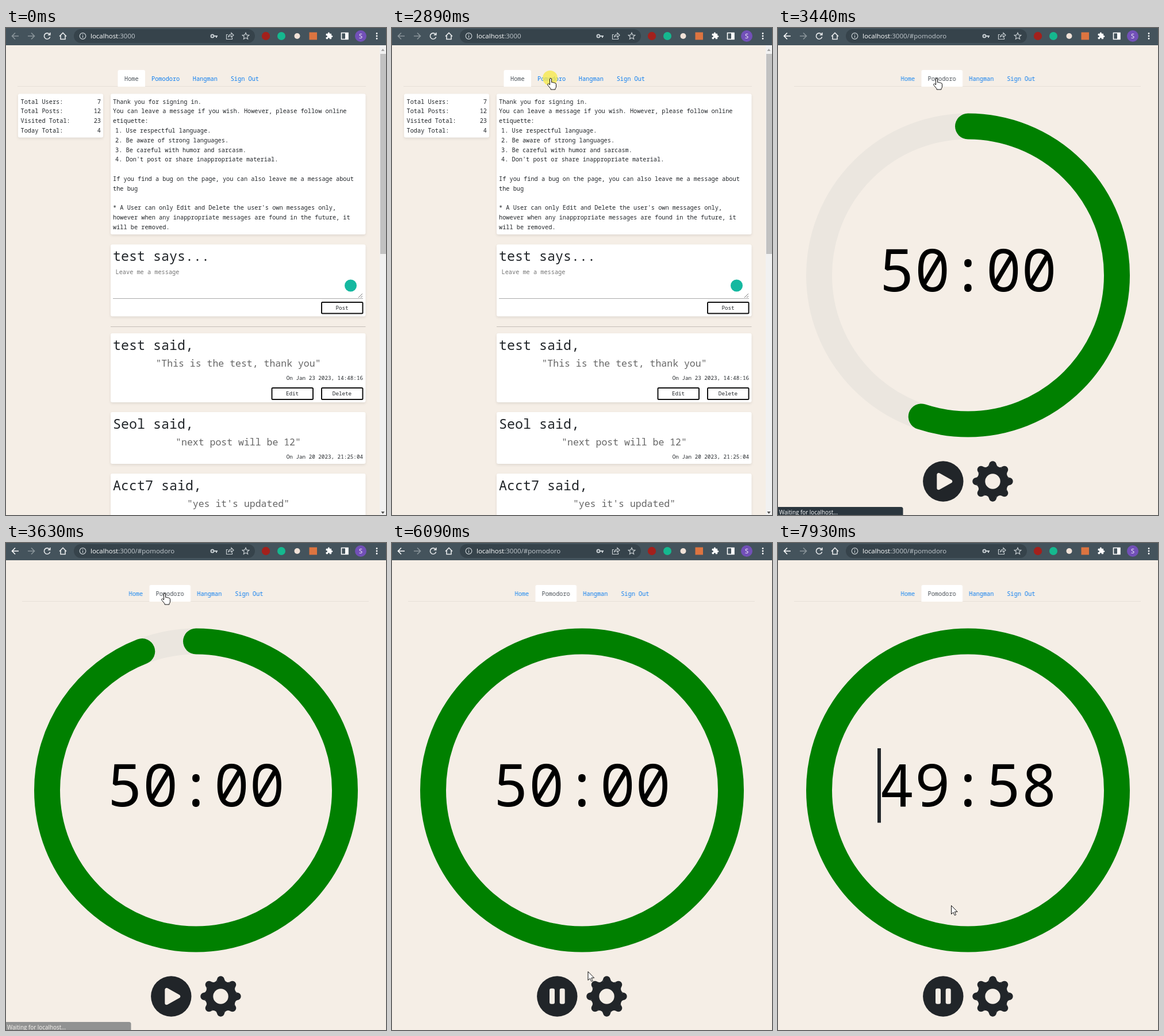
These frames come from a looping animation (661x847 px, 8 s). An HTML page:

```html
<!DOCTYPE html>
<html lang="en">
<head>
<meta charset="utf-8">
<title>Message board and timer</title>
<style>
html, body { margin: 0; width: 100%; height: 100%; overflow: hidden; background: #f5eee6; }
svg { display: block; width: 661px; height: 847px; }
text { font: 10.27px "Noto Sans Mono", monospace; fill: #212529; white-space: pre; }
.ui text { font: 11.5px "Open Sans", sans-serif; fill: #fff; }
.ui .initial { font-size: 11px; }
.ui .small { font-size: 9.9px; }
.line { fill: none; stroke: #e8eaec; stroke-width: 1.6; }
.thin { stroke: #c6cdd1; stroke-width: 1.2; }
.card { fill: #fff; filter: drop-shadow(0 2px 2px rgba(0, 0, 0, .09)); }
.bold { font-weight: 700; }
.end { text-anchor: end; }
.mid { text-anchor: middle; }
.title { font-size: 23.33px; }
.quote { font-size: 16.5px; fill: #666; text-anchor: middle; }
.note { font-size: 9.25px; }
.btn { fill: #fff; stroke: #111; stroke-width: 2; }
.rule { stroke: #e6dfd8; }
.clock text { font-size: 103px; fill: #000; text-anchor: middle; }
.ring { fill: none; stroke-width: 45; }
.dark { fill: #212529; }
.bg { fill: #f5eee6; }

/* Hard switches on an 8 s loop */
.k { animation: 8s step-end infinite; }
.home { animation-name: home; }
.timer { animation-name: timer; }
.nav { animation-name: nav; }
.back { animation-name: back; }
.path { animation-name: path; }
.tab1 { animation-name: tab1; }
.tab2 { animation-name: tab2; }
.link1 { animation-name: link1; }
.link2 { animation-name: link2; }
.t0 { animation-name: t0; }
.t1 { animation-name: t1; }
.t2 { animation-name: t2; }
.t3 { animation-name: t3; }
.play { animation-name: play; }
.pause { animation-name: pause; }
.caretR { animation-name: caretR; }
.caretL { animation-name: caretL; }
.hand { animation-name: hand; }
.arrow { animation-name: arrow; }
.click { animation-name: click; }
@keyframes home { 0% { opacity: 1 } 40.75%, 100% { opacity: 0 } }
@keyframes timer { 0% { opacity: 0 } 40.75%, 100% { opacity: 1 } }
@keyframes nav { 0% { transform: none } 40.75%, 100% { transform: translateX(7.5px) } }
@keyframes back { 0% { stroke: #8b959b } 40.75%, 100% { stroke: #fff } }
@keyframes path { 0% { fill: transparent } 40.75%, 100% { fill: #c3cacf } }
@keyframes tab1 { 0% { opacity: 1 } 41.75%, 100% { opacity: 0 } }
@keyframes tab2 { 0% { opacity: 0 } 41.75%, 100% { opacity: 1 } }
@keyframes link1 { 0% { fill: #495057 } 41.75%, 100% { fill: #1a88f0 } }
@keyframes link2 { 0% { fill: #0f7ff0 } 41.75%, 100% { fill: #495057 } }
@keyframes t0 { 0% { opacity: 1 } 41.75%, 100% { opacity: 0 } }
@keyframes t1 { 0% { opacity: 0 } 41.75% { opacity: 1 } 78.875%, 100% { opacity: 0 } }
@keyframes t2 { 0% { opacity: 0 } 78.875% { opacity: 1 } 91.375%, 100% { opacity: 0 } }
@keyframes t3 { 0% { opacity: 0 } 91.375%, 100% { opacity: 1 } }
@keyframes play { 0% { opacity: 1 } 68.75%, 100% { opacity: 0 } }
@keyframes pause { 0% { opacity: 0 } 68.75%, 100% { opacity: 1 } }
@keyframes caretR { 0% { opacity: 0 } 67.875% { opacity: 1 } 74.5%, 100% { opacity: 0 } }
@keyframes caretL { 0% { opacity: 0 } 81.375% { opacity: 1 } 87.875% { opacity: 0 } 94.5%, 100% { opacity: 1 } }
@keyframes hand { 0% { opacity: 0 } 11% { opacity: 1 } 50.75%, 100% { opacity: 0 } }
@keyframes arrow { 0% { opacity: 0 } 2% { opacity: 1 } 11% { opacity: 0 } 50.75%, 100% { opacity: 1 } }
@keyframes click { 0% { opacity: 0 } 36.125% { opacity: .78 } 40.75% { opacity: 0 } 67.625% { opacity: .78 } 69.875%, 100% { opacity: 0 } }

/* Smooth motion */
.fill { stroke-dasharray: 100 200; animation: fill 8s ease infinite; }
@keyframes fill { 0%, 41% { stroke-dashoffset: 101 } 47.25%, 100% { stroke-dashoffset: 0 } }
.status { animation: status 8s linear infinite; }
@keyframes status { 0%, 44.25% { opacity: 1 } 46.5%, 100% { opacity: 0 } }
.cursor { animation: cursor 8s linear infinite; }
@keyframes cursor {
  0%, 2% { transform: translate(627px, 780px); animation-timing-function: ease-out }
  11.25%, 13.49% { transform: translate(275px, 93px) }
  13.5%, 50.2% { transform: translate(275px, 87px); animation-timing-function: ease-in }
  55.5% { transform: translate(347px, 420px) }
  59% { transform: translate(305px, 664px); animation-timing-function: ease-out }
  60.75%, 61.99% { transform: translate(294px, 779px) }
  62%, 74% { transform: translate(294px, 780px) }
  78.875% { transform: translate(400px, 700px) }
  82.25%, 88.8% { transform: translate(421px, 660px) }
  92.5% { transform: translate(576px, 520px) }
  95% { transform: translate(530px, 345px) }
  97% { transform: translate(385px, 298px) }
  98.125% { transform: translate(116px, 430px) }
  99.1%, 100% { transform: translate(301px, 630px) }
}
</style>
</head>
<body>
<svg viewBox="0 0 661 847">
  <defs>
    <path id="tooth" d="M0 0L-1.505-6.61l.1-.34c.413-1.4 2.397-1.4 2.81 0l.1.34a1.464 1.464 0 0 0 2.105.872z"/>
    <g id="teeth"><use href="#tooth"/><use href="#tooth" transform="rotate(45)"/></g>
  </defs>
  <rect class="bg" width="661" height="847"/>

  <!-- Message board -->
  <g class="k home">
    <path class="rule" d="M20 101.5H626"/>
    <rect x="650" y="30" width="11" height="817" fill="#f1f1f1"/>
    <rect x="651" y="45" width="10" height="348" fill="#c1c1c1"/>
    <path d="M652.5 40l3-4 3 4z" fill="#a3a3a3"/>
    <path d="M652.5 841l3 4 3-4z" fill="#505050"/>

    <rect class="card" x="21" y="114.500" width="148" height="76" rx="3"/>
    <g class="bold">
      <text x="25.500" y="131.500">Total Users:</text>
      <text x="25.500" y="148.300">Total Posts:</text>
      <text x="25.500" y="165.100">Visited Total:</text>
      <text x="25.500" y="181.900">Today Total:</text>
    </g>
    <g class="end">
      <text x="165" y="131.500">7</text>
      <text x="165" y="148.300">12</text>
      <text x="165" y="165.100">23</text>
      <text x="165" y="181.900">4</text>
    </g>

    <rect class="card" x="182" y="114.500" width="443.500" height="244.500" rx="3"/>
    <text x="186" y="131.500">Thank you for signing in.</text>
    <text x="186" y="148.300">You can leave a message if you wish. However, please follow online</text>
    <text x="186" y="165.100">etiquette:</text>
    <text x="190" y="181.900">1. Use respectful language.</text>
    <text x="190" y="198.700">2. Be aware of strong languages.</text>
    <text x="190" y="215.500">3. Be careful with humor and sarcasm.</text>
    <text x="190" y="232.300">4. Don't post or share inappropriate material.</text>
    <g class="bold">
      <text x="186" y="265.900">If you find a bug on the page, you can also leave me a message about</text>
      <text x="186" y="282.700">the bug</text>
    </g>
    <text x="186" y="316.300">* A User can only Edit and Delete the user's own messages only,</text>
    <text x="186" y="333.100">however when any inappropriate messages are found in the future, it</text>
    <text x="186" y="349.900">will be removed.</text>

    <rect class="card" x="182" y="376.500" width="443.500" height="125" rx="3"/>
    <text class="title" x="186" y="405">test says...</text>
    <text x="190.500" y="427.500" style="fill:#757575">Leave me a message</text>
    <path d="M186 470.500H621" stroke="#aaa"/>
    <path d="M613 469l7-7M617 469l3-3" stroke="#666" stroke-width=".9"/>
    <circle cx="599.500" cy="448" r="10.500" fill="#15b8a0"/>
    <rect class="btn" x="549" y="477" width="71.500" height="19.500" rx="1.500"/>
    <text class="note mid" x="584.500" y="489.800">Post</text>

    <path d="M182 519.500H625.500" stroke="#c4beb8"/>

    <rect class="card" x="182" y="531" width="443.500" height="120" rx="3"/>
    <text class="title" x="186" y="559.500">test said,</text>
    <text class="quote" x="404" y="589">"This is the test, thank you"</text>
    <text class="note end" x="621" y="611.500">On Jan 23 2023, 14:48:16</text>
    <rect class="btn" x="462.500" y="626" width="71.500" height="20" rx="1.500"/>
    <rect class="btn" x="549" y="626" width="71.500" height="20" rx="1.500"/>
    <text class="note mid" x="498" y="639.300">Edit</text>
    <text class="note mid" x="584.500" y="639.300">Delete</text>

    <rect class="card" x="182" y="668" width="443.500" height="90" rx="3"/>
    <text class="title" x="186" y="696.500">Seol said,</text>
    <text class="quote" x="404" y="726">"next post will be 12"</text>
    <text class="note end" x="621" y="748.500">On Jan 20 2023, 21:25:04</text>

    <rect class="card" x="182" y="775" width="443.500" height="90" rx="3"/>
    <text class="title" x="186" y="803.500">Acct7 said,</text>
    <text class="quote" x="404" y="833">"yes it's updated"</text>
  </g>

  <!-- Timer -->
  <g class="k timer">
    <path class="rule" d="M28 101.500H631"/>
    <circle class="ring" cx="330.500" cy="430" r="259" stroke="#ebe6df"/>
    <circle class="ring fill" cx="330.500" cy="430" r="259" stroke="#008000" stroke-linecap="round" pathLength="100" transform="rotate(-90 330.500 430)"/>
    <g class="clock">
      <text class="k t0" x="330.500" y="458">00:00</text>
      <text class="k t1" x="330.500" y="458">50:00</text>
      <text class="k t2" x="330.500" y="458">49:59</text>
      <text class="k t3" x="330.500" y="458">49:58</text>
    </g>
    <rect class="dark k caretR" x="482" y="357" width="6" height="129.500"/>
    <rect class="dark k caretL" x="173" y="357" width="6" height="129.500"/>
    <circle class="dark" cx="287.300" cy="788.500" r="35.200"/>
    <path class="bg k play" d="M279.500 777v23l20.500-11.500z" stroke="#f5eee6" stroke-width="6.400" stroke-linejoin="round"/>
    <g class="bg k pause">
      <rect x="274" y="774.800" width="9" height="27" rx="3"/>
      <rect x="291.700" y="774.800" width="9" height="27" rx="3"/>
    </g>
    <g class="dark" transform="translate(373.500 788.500) scale(4.400)">
      <circle r="6.100"/>
      <use href="#teeth"/>
      <use href="#teeth" transform="rotate(90)"/>
      <use href="#teeth" transform="rotate(180)"/>
      <use href="#teeth" transform="rotate(270)"/>
      <circle class="bg" r="3"/>
    </g>
    <g class="ui status">
      <path d="M0 833H214q3.500 0 3.500 3.500V847H0z" fill="#2b363e"/>
      <text class="small" x="2" y="846">Waiting for localhost...</text>
    </g>
  </g>

  <g class="k nav">
    <path class="k tab1" d="M194.500 102V76q0-3 3-3h41.500q3 0 3 3v26z" fill="#fff"/>
    <path class="k tab2" d="M242 102V76q0-3 3-3h65.500q3 0 3 3v26z" fill="#fff"/>
    <text class="k link1" x="206" y="91.700">Home</text>
    <text class="k link2" x="253" y="91.700">Pomodoro</text>
    <g style="--c:#0f7ff0">
      <text x="324.800" y="91.700" style="fill:var(--c)">Hangman</text>
      <text x="390.700" y="91.700" style="fill:var(--c)">Sign Out</text>
    </g>
  </g>

  <!-- Browser bar -->
  <g class="ui">
    <rect width="661" height="30" fill="#44535c"/>
    <rect x="118" y="2" width="315" height="24" rx="12" fill="#36434b"/>
    <path class="line k back" d="M22 14H11M16 8.500L10.500 14l5.500 5.500"/>
    <path class="line" d="M38 14h11M44 8.500l5.500 5.500-5.500 5.500" style="stroke:#8b959b"/>
    <path class="line" d="M75.800 11a5.200 5.200 0 1 0 .8 4.500M76.800 8v4h-4"/>
    <path class="line" d="M93 14.500L99 8.500l6 6M95 13v6.500h8V13"/>
    <circle class="line thin" cx="133.500" cy="14" r="5.300"/>
    <path class="line thin" d="M133.500 13v4M133.500 10.500v1.300"/>
    <text x="147" y="18">localhost<tspan fill="#c3cacf">:3000</tspan><tspan class="k path">/#pomodoro</tspan></text>
    <circle class="line thin" cx="359" cy="14" r="2.500" style="stroke-width:2"/>
    <path class="line thin" d="M362 14h6M366 14v3" style="stroke-width:2"/>
    <path class="line thin" d="M386 11.500h-2.500v8h10v-3M386.500 16q1-5 5.500-5V8.500l4 4-4 3.500v-2.500q-3.500 0-5.500 2.500z"/>
    <path class="line thin" d="M417 8.300l1.700 3.800 4.100.4-3.100 2.700.9 4.100-3.600-2.200-3.600 2.200.9-4.100-3.100-2.700 4.100-.4z"/>
    <circle cx="452" cy="14" r="7.200" fill="#a3201c"/>
    <circle cx="479" cy="14" r="7" fill="#15b88f"/>
    <circle cx="506.500" cy="14" r="5" fill="#f1e2d8"/>
    <rect x="527.500" y="7.500" width="13.500" height="13" fill="#dd7440"/>
    <path transform="translate(555.500 7) scale(.56)" fill="#fff" d="M20.500 11H19V7c0-1.100-.9-2-2-2h-4V3.500a2.500 2.500 0 0 0-5 0V5H4c-1.100 0-2 .9-2 2v3.800h1.500a2.700 2.700 0 0 1 0 5.400H2V20c0 1.100.9 2 2 2h3.800v-1.500a2.700 2.700 0 0 1 5.400 0V22H17c1.100 0 2-.9 2-2v-4h1.500a2.500 2.500 0 0 0 0-5z"/>
    <path d="M583.500 8.500h11.500v11h-11.500z" fill="none" stroke="#fff" stroke-width="1.600"/>
    <path d="M590 8.500h5v11h-5z" fill="#fff"/>
    <circle cx="617" cy="14" r="10" fill="#7250b8"/>
    <text class="initial mid" x="617" y="18">S</text>
    <path d="M645 9.500h0M645 14h0M645 18.500h0" stroke="#fff" stroke-width="2.800" stroke-linecap="round"/>
  </g>

  <g class="cursor">
    <circle class="k click" r="13" fill="#f6ea4a"/>
    <path class="k hand" fill="#fff" stroke="#111" stroke-linejoin="round" d="M-.5 12V2q0-1.600 1.500-1.600T2.500 2v5.500q1.500-1 3 .5 1.700-.8 2.800.8 2.200-.3 2.200 2V15q0 2-1.500 3.500V20H1v-1.500L-4 12.500q-1-1.600.3-2.300t2.200.5z"/>
    <path class="k arrow" fill="#fff" stroke="#111" stroke-linejoin="round" d="M.5.500v15l3.400-3.200 2.400 5.300 2.300-1-2.300-5.200h4.800z"/>
  </g>
</svg>
</body>
</html>
```
